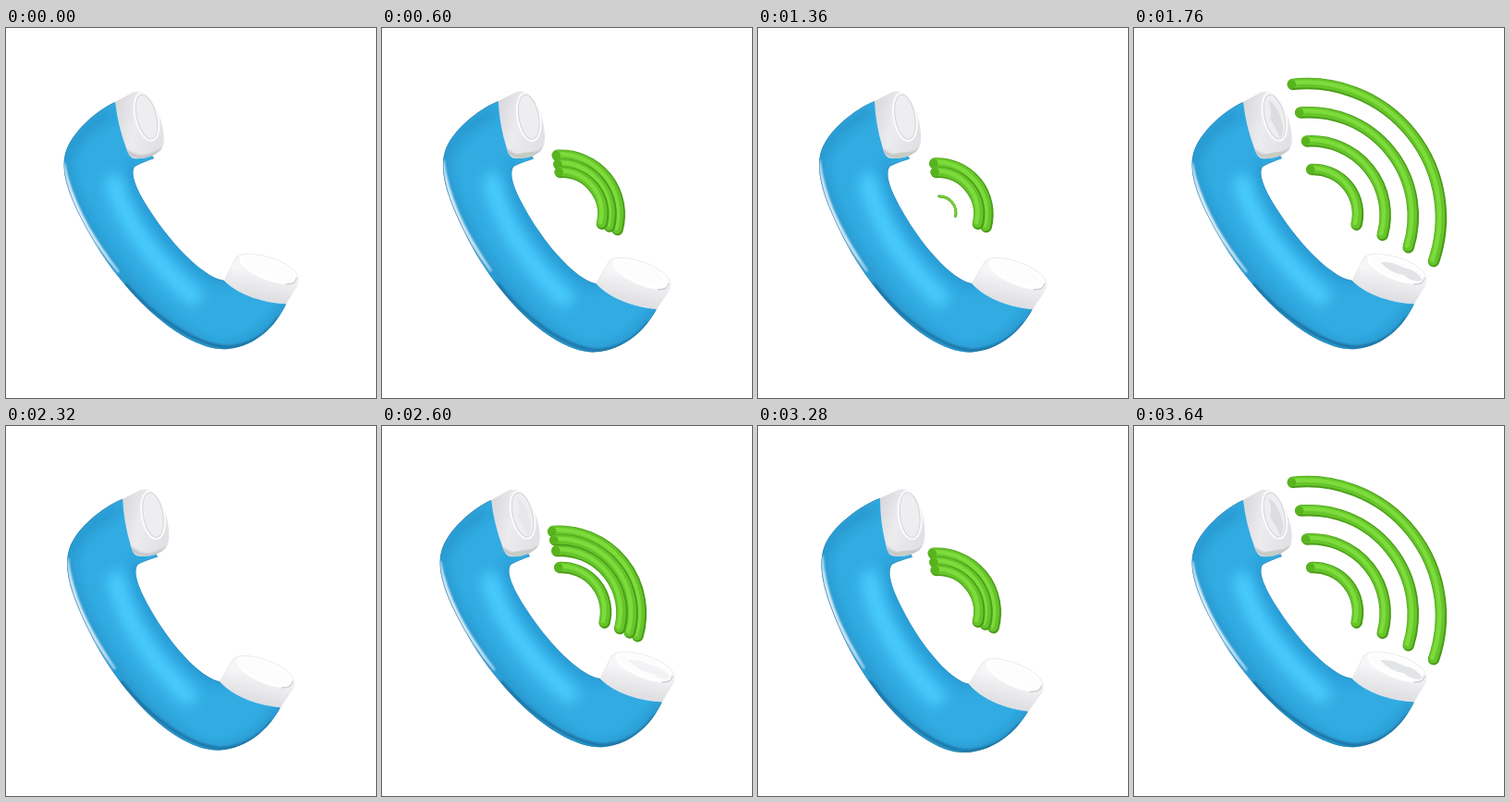
Write an HTML page that moves like this. It is 400 px wide and 400 px high and loops after 3.84 s.

```html
<!DOCTYPE html>
<html lang="en">
<head>
<meta charset="utf-8">
<title>Ringing phone</title>
<style>
  html, body { margin: 0; height: 100%; overflow: hidden; background: #fff; }
  svg { display: block; width: 100vw; height: 100vh; }
  .line { fill: none; stroke-linecap: round; }
</style>
</head>
<body>
<svg viewBox="0 0 400 400">
  <defs>
    <path id="body" d="M118 80C98 89 70 113 64 136C58 160 72 190 90 222C112 262 150 308 190 332C212 345 228 348 240 347C270 344 292 322 303 298L270 280L236 273C219 271 192 247 170 218C148 188 132 161 139 150Q146 146 160 141L140 110Z"/>
    <path id="topCup" d="M118 80L136 70C149 64 162 80 168 102C172 118 172 128 166 133C159 139 149 142 138 141Q133 140 130 130Q121 106 118 80Z"/>
    <path id="lowCup" d="M252 246C262 241 290 247 305 257C316 264 318 271 314 279L303 298C280 297 252 289 236 273L246 253Q248 247 252 246Z"/>
    <clipPath id="inBody"><use href="#body"/></clipPath>
    <clipPath id="inTop"><use href="#topCup"/></clipPath>
    <clipPath id="inLow"><use href="#lowCup"/></clipPath>
    <filter id="soft" x="-40%" y="-40%" width="180%" height="180%"><feGaussianBlur stdDeviation="7"/></filter>
    <filter id="fine" x="-30%" y="-30%" width="160%" height="160%"><feGaussianBlur stdDeviation="1.2"/></filter>
    <linearGradient id="topShade" x1="0" y1="0" x2="1" y2=".3">
      <stop stop-color="#d6d6da"/><stop offset=".5" stop-color="#ececef"/><stop offset="1" stop-color="#e2e2e6"/>
    </linearGradient>
    <linearGradient id="lowShade" x1=".6" y1="0" x2=".35" y2="1">
      <stop offset=".35" stop-color="#f6f6f8"/><stop offset="1" stop-color="#d9d9dd"/>
    </linearGradient>
  </defs>

  <g id="phone">
    <use href="#body" fill="#32abe2"/>
    <g class="line" clip-path="url(#inBody)">
      <path d="M112 92C84 108 64 128 64 150C68 200 150 320 225 348Q275 352 306 296" stroke="#1f86bd" stroke-width="7" filter="url(#soft)"/>
      <path d="M139 148C130 165 152 200 172 224C195 252 218 270 240 274" stroke="#1e8cc8" stroke-width="7" filter="url(#soft)"/>
      <path d="M117 168C126 204 156 250 202 290" stroke="#4accff" stroke-width="20" filter="url(#soft)"/>
      <path d="M63 146C65 180 88 225 122 264C98 232 77 200 66 160Z" fill="#fff" stroke="#eef3fa" stroke-width="1.5" filter="url(#fine)"/>
      <path d="M130 277C160 312 205 343 240 345Q275 342 294 314" stroke="#1a6a99" stroke-width="2.5" filter="url(#fine)"/>
      <use href="#body" stroke="#35607e" opacity=".5"/>
    </g>

    <use href="#topCup" fill="url(#topShade)"/>
    <g class="line" clip-path="url(#inTop)">
      <path d="M130 133Q147 147 170 131" stroke="#c2c3c8" stroke-width="4" filter="url(#fine)"/>
      <ellipse cx="152" cy="96" rx="12" ry="26" transform="rotate(-14 152 96)" fill="#eeeef1" stroke="#fafafb" stroke-width="2.5"/>
      <ellipse cx="152" cy="96" rx="10.5" ry="24.5" transform="rotate(-14 152 96)" stroke="#d5d5da"/>
    </g>

    <use href="#lowCup" fill="url(#lowShade)"/>
    <g class="line" clip-path="url(#inLow)">
      <ellipse cx="284" cy="260" rx="32" ry="11" transform="rotate(21 284 260)" fill="#fdfdfe" stroke="#fff" stroke-width="3"/>
      <path d="M303 277Q314 277 314 270" stroke="#cfcfd4" stroke-width="1.5"/>
    </g>
    <use href="#lowCup" fill="none" stroke="#e6e6ea" stroke-width=".8"/>

    <path id="lip" d="M139 137Q152 134 164 133Q154 142 139 140Z" fill="#c6cdc5"/>
    <g id="glints">
      <path d="M145 78Q150 88 147 98Q154 108 158 119Q164 112 159 98Q154 82 145 78Z" fill="#dcdde0"/>
      <path d="M266 253Q280 252 291 259Q307 262 312 273Q301 276 292 267Q278 266 266 253Z" fill="#e3e4e7"/>
    </g>
  </g>
  <g id="waves" class="line"></g>
</svg>

<script>
const $ = id => document.getElementById(id);
const LOOP = 3840, STEP = 40;

// Swing of the handset: [time, amount], eased between neighbours.
const swing = [
  [0, 0], [130, -1.6], [480, 2.3], [800, -1.6], [980, 0], [1060, 0],
  [1220, 2.3], [1600, -1.6], [1760, 0], [2140, 0], [2500, 2.3],
  [2680, -1.6], [2840, 0], [3240, 2.3], [3460, -1.6], [3640, 0], [LOOP, 0]
];
// Each ring burst: [birth, end].
const bursts = [[436, 1160], [1236, 2160], [2325, 3040], [3116, LOOP]];
const rings = [[145, 0], [112.5, 44], [80, 98], [48, 170]]; // [final radius, delay]
const layers = [[1, '#4a9c18', 0], [.8, '#66c52a', -.06], [.36, '#7ddb3c', -.13]];

function swingAt(t) {
  const i = swing.findIndex(key => key[0] > t);
  const [t0, a] = swing[i - 1], [t1, b] = swing[i];
  return a + (b - a) * (1 - Math.cos(Math.PI * (t - t0) / (t1 - t0))) / 2;
}

// A ring pops out of the centre, then slides outward at constant speed.
function radiusAt(age, final) {
  if (age <= 0) return 0;
  return Math.min(final, age < 66 ? 45 * age / 66 : 45 + .225 * (age - 80 + 14 * Math.max(0, 1 - (age - 66) / 14)));
}

function drawRing(r) {
  if (!r) return '';
  const q = (r - 48) / 97, width = 12.5 * Math.min(1, (r / 45) ** 1.6);
  const point = deg => {
    const a = deg * Math.PI / 180;
    return [194 - 7 * q + r * Math.cos(a), 201 + 4 * q + r * Math.sin(a)];
  };
  const from = point(-92 - 4 * q), to = point(14 + 5 * q);
  const tube = layers.map(([w, color, shift]) =>
    `<path d="M${from}A${r} ${r} 0 0 1 ${to}" stroke="${color}" stroke-width="${w * width}"
      transform="translate(${shift * width} ${shift * width})"/>`).join('');
  return tube + `<circle cx="${from[0] - width * .12}" cy="${from[1]}" r="${width * .38}" fill="#58b41e"/>`;
}

function render(t) {
  const k = swingAt(t), sx = .057 * k, sy = .033 * k;
  $('phone').setAttribute('transform', `matrix(1 ${sy} ${-sx} 1 ${203 * sx} ${-148 * sy})`);
  const burst = bursts.find(([birth, end]) => t >= birth && t < end);
  const radii = rings.map(([final, delay]) => burst ? radiusAt(t - burst[0] - delay, final) : 0);
  $('waves').innerHTML = radii.map(drawRing).join('');
  $('lip').style.opacity = burst ? 1 : 0;
  $('glints').style.opacity = Math.max(0, Math.min(1, (radii[0] - 66) / 60));
}

function tick() {
  render(Math.floor(performance.now() % LOOP / STEP) * STEP);
  requestAnimationFrame(tick);
}
tick();
</script>
</body>
</html>
```
